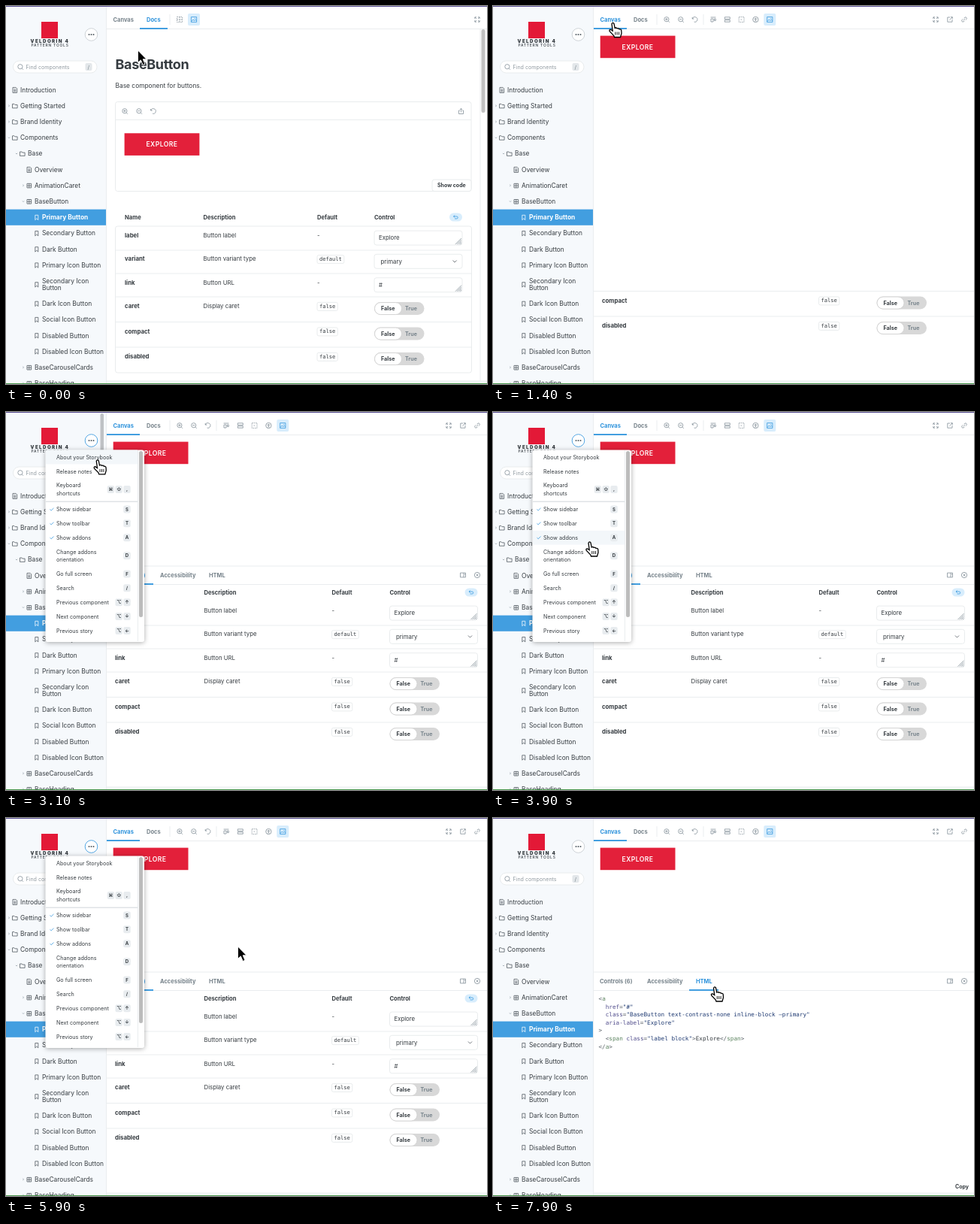
These frames come from a looping animation (640x503 px, 8 s). An HTML page:

```html
<!DOCTYPE html>
<html lang="en">
<head>
<meta charset="utf-8">
<title>Component explorer</title>
<style>
  html, body { margin: 0; width: 100%; height: 100%; overflow: hidden; background: #fff; }
  svg { display: block; width: 640px; height: 503px; }
  text { font-family: Inter, Arial, sans-serif; fill: #363c41; white-space: pre; }
  .b { font-weight: 700; }
  .muted { fill: #77838b; }
  .blue { fill: #2e93dc; }
  .white { fill: #fff; }
  .mono { font-family: "DejaVu Sans Mono", monospace; }
  .icon { fill: none; stroke: #7d8a93; stroke-width: .75; }
  .icon.dark { stroke: #4a5258; }
  .icon.on { stroke: #2e93dc; }
  .icon.light { stroke: #fff; }
  .icon.dashed { stroke-dasharray: 1.5 1; }
  .line { stroke: #eaedef; stroke-width: 1; fill: none; }
  .box { stroke: #e4e7e9; stroke-width: .8; fill: #fff; }
  .bracket { fill: #596067; }
  .tag { fill: #5c8460; }
  .attr { fill: #514d8c; }
  .string { fill: #1f3a72; }
</style>
</head>
<body>
<svg id="stage" viewBox="0 0 640 503"></svg>
<script>
const stage = document.getElementById('stage');

// Text is placed by the vertical centre of its capitals.
const text = (x, cy, s, size, cls = '', extra = '') =>
  `<text x="${x}" y="${cy + size * .36}" font-size="${size}" class="${cls}" ${extra}>${s}</text>`;
const rect = (x, y, w, h, fill, r = 0, extra = '') =>
  `<rect x="${x}" y="${y}" width="${w}" height="${h}" rx="${r}" fill="${fill}" ${extra}/>`;
const box = (x, y, w, h, r = 3) =>
  `<rect class="box" x="${x}" y="${y}" width="${w}" height="${h}" rx="${r}"/>`;
const hLine = (x1, x2, y) => `<path class="line" d="M${x1} ${y}H${x2}"/>`;
const vLine = (x, y1, y2) => `<path class="line" d="M${x} ${y1}V${y2}"/>`;
const group = (id, content, extra = '') => `<g id="${id}" ${extra}>${content}</g>`;

const lens = 'M2.4 2.2L4 3.8M3 -.3A3.1 3.1 0 1 1 -3.2 -.3A3.1 3.1 0 1 1 3 -.3';
const shapes = {
  doc: 'M-2.8 -3.5H1.4L2.8 -2.1V3.5H-2.8ZM-1.4 -1H1.4M-1.4 .5H1.4M-1.4 2H1.4',
  folder: 'M-3.3 -2.7H-.8L.2 -1.6H3.3V2.7H-3.3Z',
  component: 'M-2.8 -2.8H2.8V2.8H-2.8ZM0 -2.8V2.8M-2.8 0H2.8',
  story: 'M-2 -3.2H2V3.2L0 1.3L-2 3.2Z',
  search: lens,
  zoomIn: lens + 'M-1.7 -.3H1.5M-.1 -1.9V1.3',
  zoomOut: lens + 'M-1.7 -.3H1.5',
  reset: 'M-3.4 -3V-.9H-1.3M-3.2 -1A3.3 3.3 0 1 1 -1 3.1',
  grid: 'M-3.5 -3.5H3.5V3.5H-3.5ZM0 -3.5V3.5M-3.5 0H3.5',
  image: 'M-3.6 -3.4H3.6V3.4H-3.6ZM-3.4 2.6L-1 0L.6 1.4L2 .2L3.5 1.8M1 -1.5H2',
  align: 'M-3.4 -3H3.4M-3 -1H0V3H-3ZM1.5 -1H3.3V1.5H1.5Z',
  measure: 'M-3.5 -3.2H3.5V-.6H-3.5ZM-3.5 .8H3.5V3.2H-3.5Z',
  outline: 'M-3.4 -3.4H3.4V3.4H-3.4ZM-1 0H1',
  person: 'M3.7 0A3.7 3.7 0 1 1 -3.7 0A3.7 3.7 0 1 1 3.7 0M-2 -.8H2M0 -2.2V.8L-1 2.6M0 .8L1 2.6',
  expand: 'M-3.2 -1V-3.2H-1M1 -3.2H3.2V-1M3.2 1V3.2H1M-1 3.2H-3.2V1M-3 -3L-1 -1M3 3L1 1M3 -3L1 -1M-3 3L-1 1',
  open: 'M0 -3H-3.2V3.2H3V0M.8 -3.3H3.3V-.8M3.2 -3.2L-.5 .6',
  link: 'M-.3 -1.8L1 -3A1.7 1.7 0 0 1 3.2 -.7L1.8 .6M.3 1.8L-1 3A1.7 1.7 0 0 1 -3.2 .7L-1.8 -.6M-1.2 1.2L1.2 -1.2',
  share: 'M-1.5 -1H-3V3.5H3V-1H1.5M0 1.5V-3.6M-1.5 -2.2L0 -3.7L1.5 -2.2',
  side: 'M-3.5 -2.9H3.5V2.9H-3.5ZM1 -2.9V2.9M2 -1H3',
  close: 'M3.7 0A3.7 3.7 0 1 1 -3.7 0A3.7 3.7 0 1 1 3.7 0M-1.4 -1.4L1.4 1.4M1.4 -1.4L-1.4 1.4',
  undo: 'M-1.3 -2.4L-3 -1L-1.3 .4M-3 -1H1.2A1.5 1.5 0 0 1 1.2 2H-1.5',
  chevron: 'M-2.6 -1.3L0 1.3L2.6 -1.3',
  grip: 'M-4 4L4 -4M-1.8 4L4 -1.8M.4 4L4 .4M2.4 4L4 2.4',
  check: 'M-2.5 0L-.8 1.6L2.5 -1.6',
  right: 'M-.6 -1L.5 0L-.6 1',
  down: 'M-1 -.5L0 .5L1 -.5'
};
const icon = (name, x, y, cls = '') =>
  `<path class="icon ${cls}" transform="translate(${x} ${y})" d="${shapes[name]}"/>`;
const activeIcon = (name, x) => rect(x - 8, 10, 16, 16, '#d8edfc', 2) + icon(name, x, 18, 'on');

function sidebar() {
  const entries = [
    ['Introduction', 19, 'doc'], ['Getting Started', 19, 'folder', 'right'],
    ['Brand Identity', 19, 'folder', 'right'], ['Components', 19, 'folder', 'down'],
    ['Base', 29, 'folder', 'down'], ['Overview', 38, 'doc'],
    ['AnimationCaret', 38, 'component', 'right'], ['BaseButton', 38, 'component', 'down'],
    ['Primary Button', 48, 'story'], ['Secondary Button', 48, 'story'],
    ['Dark Button', 48, 'story'], ['Primary Icon Button', 48, 'story'],
    ['Secondary Icon|Button', 48, 'story'], ['Dark Icon Button', 48, 'story'],
    ['Social Icon Button', 48, 'story'], ['Disabled Button', 48, 'story'],
    ['Disabled Icon Button', 48, 'story'], ['BaseCarouselCards', 38, 'component', 'right'],
    ['BaseHeading', 38, 'component', 'right']
  ];
  let out = rect(0, 0, 133, 503, '#f6f9fc')
    + group('sideScroll', rect(125.5, 2, 4.5, 303, '#bfc2c5', 2.2))
    + rect(47, 21, 22, 22, '#e31937')
    + text(58.5, 47.2, 'VELDORIN 4', 6.2, '', 'font-weight="900" letter-spacing="1.4" text-anchor="middle"')
    + text(58.5, 52.3, 'PATTERN TOOLS', 4.9, '', 'font-weight="500" letter-spacing=".8" text-anchor="middle"')
    + '<circle id="dots" cx="113.5" cy="38" r="8.3" fill="#fff" stroke-width=".9"/>'
    + [110.5, 113.5, 116.5].map(x => `<circle cx="${x}" cy="38" r="1" fill="#555f66"/>`).join('')
    + box(9.5, 73, 111.5, 16, 8) + icon('search', 19, 81)
    + text(26.5, 81, 'Find components', 7.1, 'muted', 'opacity=".8"')
    + rect(105.5, 76, 9, 10, '#e3e7ea', 2) + text(108.5, 81, '/', 7, 'muted')
    + rect(0, 270.6, 133, 21.2, '#429ee0');
  let y = 111.6;
  for (const [name, x, kind, caret] of entries) {
    const lines = name.split('|'), selected = name === 'Primary Button';
    if (lines.length > 1) y += 4.6;
    out += icon(kind, x - 7.2, y + .3, selected ? 'light' : 'dark');
    if (caret) out += icon(caret, x - 15, y);
    lines.forEach((line, i) => out += text(x, y + (i - (lines.length - 1) / 2) * 9, line, 8.4, selected ? 'b white' : ''));
    y += lines.length > 1 ? 25.5 : 21.2;
  }
  return out;
}

const tabs = docsActive =>
  rect(134, 1, 506, 29, '#fff') + hLine(134, 640, 30.5)
  + text(142.5, 18, 'Canvas', 7.5, docsActive ? 'b muted' : 'b blue')
  + text(187, 18, 'Docs', 7.5, docsActive ? 'b blue' : 'b muted')
  + (docsActive ? rect(178, 29, 37, 2, '#429ee0') : rect(134, 29, 44, 2, '#429ee0'))
  + vLine(218, 11, 25);

const exploreButton = (x, y) => rect(x, y, 99.8, 29.6, '#e3203a')
  + text(x + 49.8, y + 15, 'EXPLORE', 8.6, 'white', 'font-weight="600" letter-spacing=".4" text-anchor="middle"');

function argsTable([nameX, descX, defaultX, controlX], top, x1, x2) {
  const rows = [
    ['label', 'Button label', '-', 'area', 'Explore'],
    ['variant', 'Button variant type', 'default', 'select', 'primary'],
    ['link', 'Button URL', '-', 'area', '#'],
    ['caret', 'Display caret', 'false'], ['compact', '', 'false'], ['disabled', '', 'false']
  ];
  const offsets = [0, 31.2, 62.6, 94, 127.5, 161], borders = [20, 51, 82, 115.5, 149];
  const header = top - 24;
  let out = ['Name', 'Description', 'Default', 'Control']
    .map((s, i) => text([nameX, descX, defaultX, controlX][i], header, s, 7.6, 'b')).join('')
    + rect(controlX + 100, header - 5.5, 17, 11, '#d8edfc', 5.5) + icon('undo', controlX + 108.5, header, 'on')
    + borders.map(b => hLine(x1, x2, top + b)).join('');
  rows.forEach(([name, desc, value, kind, content], i) => {
    const y = top + offsets[i] + .4, c = y + 3.2, x = controlX;
    out += text(nameX, y, name, 7.8, 'b') + text(descX, y, desc, 7.8);
    if (value === '-') out += text(defaultX, y, value, 7.8);
    else out += box(defaultX, y - 5, value.length * 4.26 + 6, 11, 2)
      + text(defaultX + 3, y, value, 7.1, 'mono');
    if (!kind) {
      out += rect(x, c - 8.5, 66.5, 17, '#d8d8d8', 8.5)
        + `<rect x="${x + .5}" y="${c - 8}" width="36" height="16" rx="8" fill="#fff" stroke="#cfcfcf" stroke-width=".8"/>`
        + text(x + 9, c, 'False', 7.2, 'b') + text(x + 41, c, 'True', 7.1, 'b muted');
      return;
    }
    out += box(x, c - 9.5, 117, 19) + text(x + (kind === 'area' ? 6 : 8.5), c, content, 7.8)
      + (kind === 'area' ? icon('grip', x + 112, c + 4.5) : icon('chevron', x + 107, c, 'dark'));
  });
  return out;
}

const docsView = () => rect(134, 1, 506, 498, '#fff') + tabs(true)
  + icon('grid', 231, 18, 'dashed') + activeIcon('image', 250) + icon('expand', 627, 18)
  + text(145.5, 78, 'BaseButton', 18, 'b', 'letter-spacing="-.35"')
  + text(145.5, 105.5, 'Base component for buttons.', 8.4)
  + box(145.5, 127.5, 473.5, 119) + hLine(146, 619, 151.5)
  + icon('zoomIn', 158, 140) + icon('zoomOut', 177, 140) + icon('reset', 196, 140) + icon('share', 605.5, 140)
  + exploreButton(157.6, 169.3)
  + box(567, 231, 52, 15.5) + text(574, 238.7, 'Show code', 7, 'b')
  + box(145.5, 293, 474, 195)
  + argsTable([158, 262.5, 414, 490], 305, 146, 619)
  + vLine(631, 31, 499) + rect(632.5, 31, 5, 111, '#c1c1c1', 2.5);

const canvasView = () => rect(134, 1, 506, 498, '#fff') + tabs(false)
  + ['zoomIn', 'zoomOut', 'reset'].map((n, i) => icon(n, 231 + i * 18.8, 18)).join('')
  + vLine(280, 11, 25)
  + ['align', 'measure', 'outline', 'person'].map((n, i) =>
      icon(n, 293 + i * 18.8, 18, n === 'outline' ? 'dashed' : '')).join('')
  + activeIcon('image', 368.3)
  + ['expand', 'open', 'link'].map((n, i) => icon(n, 589 + i * 19, 18)).join('')
  + exploreButton(142.7, 39.6);

const addonTabs = active => [['Controls (6)', 142, 134, 62], ['Accessibility', 205, 197, 63], ['HTML', 270, 261, 39]]
  .map(([s, x, lineX, w]) => text(x, 217, s, 7.5, s === active ? 'b blue' : 'b muted')
    + (s === active ? rect(lineX, 228, w, 2, '#429ee0') : '')).join('');

const addonFrame = active => rect(134, 205, 506, 294, '#fff')
  + hLine(134, 640, 205) + hLine(134, 640, 229.5) + addonTabs(active)
  + icon('side', 608, 217) + icon('close', 627, 217);

function htmlSource() {
  const span = (cls, s) => `<tspan class="${cls}">${s}</tspan>`;
  const open = s => span('bracket', '&lt;' + (s[0] === '/' ? '/' : '')) + span('tag', s.replace('/', ''));
  const end = span('bracket', '&gt;');
  const attr = (name, value) => span('attr', name) + span('bracket', '=') + span('string', `"${value}"`);
  return [
    open('a'), '  ' + attr('href', '#'),
    '  ' + attr('class', 'BaseButton text-contrast-none inline-block –primary'),
    '  ' + attr('aria-label', 'Explore'), end,
    '  ' + open('span') + ' ' + attr('class', 'label block') + end + 'Explore' + open('/span') + end,
    open('/a') + end
  ].map((line, i) => text(140.5, 240.3 + i * 10.6, line, 7.66, 'mono')).join('')
    + text(615, 490, 'Copy', 7, 'b');
}

const menuRows = [
  [60, 'About your Storybook', ''], [79, 'Release notes', ''], [103, 'Keyboard|shortcuts', '⌘⇧,'],
  [129.5, 'Show sidebar', 'S', 1], [148.3, 'Show toolbar', 'T', 1], [167.2, 'Show addons', 'A', 1],
  [191.3, 'Change addons|orientation', 'D'], [215.5, 'Go full screen', 'F'], [234.3, 'Search', '/'],
  [253.2, 'Previous component', '⌥↑'], [272, 'Next component', '⌥↓'], [291, 'Previous story', '⌥←']
];
function menu() {
  let out = rect(52.5, 50.5, 131.5, 255.5, '#fff', 3, 'style="filter:drop-shadow(0 1px 3px #0005)"')
    + rect(53, 0, 122, 18.8, '#f3f7fa', 0, 'id="hover"')
    + rect(53, 118.5, 122, 1.5, '#dfe3e6') + vLine(175.5, 51, 305)
    + rect(177, 52, 5, 221, '#bcbcbc', 2.5);
  for (const [y, label, keys, checked] of menuRows) {
    const lines = label.split('|');
    lines.forEach((s, i) => out += text(67, y + (i - (lines.length - 1) / 2) * 10.6, s, 7.2));
    [...keys].forEach((key, i) => {
      const x = 161 - (keys.length - 1 - i) * 10.8;
      out += rect(x - 4.7, y - 5, 9.4, 10, '#e8ecef', 2)
        + text(x, y, key, 6, 'b', 'text-anchor="middle"');
    });
    if (checked) out += group('check' + keys, icon('check', 61, y, 'on'));
  }
  return out;
}

const arrow = '<path d="M.5 0V16.3L4.3 12.8L7.2 19.5L10 18.3L7.2 11.8H12Z" fill="#000" stroke="#fff" stroke-width=".9"/>';
const hand = '<path d="M4 2.2Q5.3 -.2 7 2L8.2 8Q10 6.8 11.2 8.5Q13.2 7.6 14 9.4Q16.4 8.8 16.8 11.2L17 15L15.5 20H7.5L6.8 18L1.2 12.2Q.2 9.8 2.6 9.8L5.2 11.6Z" fill="#fff" stroke="#000" stroke-width="1.3"/>'
  + '<path d="M8.8 13V17M11.2 13V17M13.6 13V17" stroke="#000" stroke-width=".9"/>';

stage.innerHTML = rect(0, 0, 640, 503, '#f6f9fc') + sidebar()
  + group('docs', docsView()) + group('canvas', canvasView())
  + group('controls', addonFrame('Controls (6)') + argsTable([145, 263.5, 433.5, 510.5], 264, 134, 640))
  + group('html', addonFrame('HTML') + htmlSource())
  + group('loading', rect(134, 200, 506, 178, '#fff'))
  + vLine(133.5, 1, 502) + hLine(134, 640, 499)
  + group('status', rect(0, 492, 238.5, 10, '#d9dcdf', 0, 'opacity=".85"')
    + text(1, 497, 'localhost:6006/?path=/story/components-base-basebutton--primary-button', 6.2, 'white', 'opacity=".8"'))
  + group('menu', menu())
  + rect(0, 0, 640, 1, '#5c5296') + rect(0, 502, 640, 1, '#4c9a50')
  + group('cursor', group('arrow', arrow) + group('hand', hand));

const node = id => document.getElementById(id);
const show = (id, visible) => node(id).style.display = visible ? '' : 'none';
const within = (t, ...spans) => spans.some(([from, to]) => t >= from && t < to);

const path = [
  [0, 175, 59], [100, 175, 59], [900, 154, 21.5], [1800, 154, 21.5], [2500, 115, 42.5], [2900, 115, 42.5],
  [3700, 123, 172], [5400, 123, 172], [5800, 308, 171], [6300, 308, 171], [6900, 289.5, 224], [8000, 289.5, 224]
];
function cursorAt(t) {
  const i = path.findIndex(key => key[0] > t);
  const [t0, x0, y0] = path[i - 1], [t1, x1, y1] = path[i];
  const p = (t - t0) / (t1 - t0), e = p * p * (3 - 2 * p);
  return [x0 + (x1 - x0) * e, y0 + (y1 - y0) * e];
}

function draw(now) {
  const t = Math.max(0, now) % 8000;
  const [x, y] = cursorAt(t);
  const addonsHidden = within(t, [4300, 5000]);
  const menuOpen = within(t, [2800, 6400]);
  const pointing = within(t, [750, 1950], [2350, 5480], [6750, 8000]);

  show('docs', t < 1100);
  show('canvas', t >= 1100);
  show('controls', within(t, [1400, 7500]) && !addonsHidden);
  show('html', t >= 7500);
  show('loading', within(t, [1400, 1500]));
  show('sideScroll', within(t, [2300, 3200]));
  show('status', within(t, [800, 1100], [1800, 2700]));
  show('menu', menuOpen);
  show('checkA', !addonsHidden);
  node('dots').setAttribute('stroke', menuOpen ? '#429ee0' : '#c9cfd3');

  const row = x < 165 && menuRows.find(([cy, label]) => Math.abs(cy - y - 1) < (label.includes('|') ? 14.5 : 9.5));
  show('hover', row);
  if (row) node('hover').setAttribute('y', row[0] - 9.4);

  show('hand', pointing);
  show('arrow', !pointing);
  node('cursor').setAttribute('transform', `translate(${x} ${y})`);
  requestAnimationFrame(draw);
}
draw(performance.now());
</script>
</body>
</html>
```
